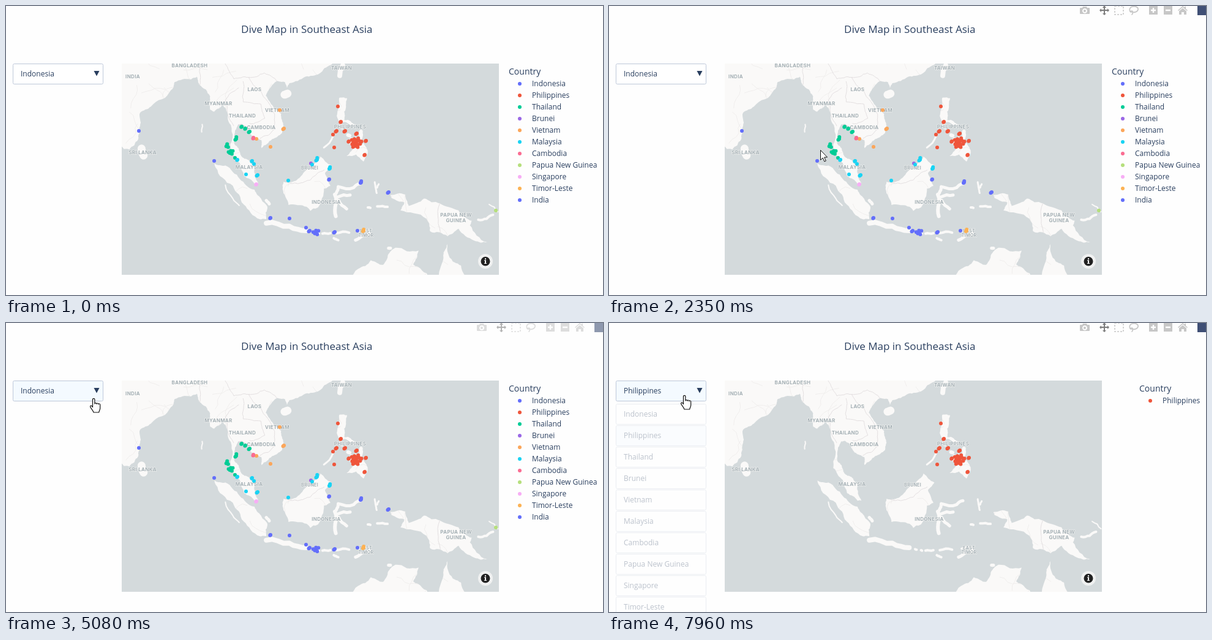
Animation of 975x472 px, one loop 8000 ms. Source, as an HTML page:

```html
<!DOCTYPE html>
<html lang="en">
<head>
<meta charset="utf-8">
<title>Dive Map</title>
<style>
html, body { margin: 0; width: 100%; height: 100%; overflow: hidden; background: #fefefe; }
svg { display: block; }
text { font-family: "Open Sans", "Noto Sans", sans-serif; font-size: 12px; fill: #2a3f5f; white-space: pre; }
.place text { font: 600 8px Inter, "Open Sans", sans-serif; letter-spacing: .35px; fill: #9eaab0; text-anchor: middle; stroke: #f6f6f4; stroke-width: 1.2px; paint-order: stroke; }
.tip text { font: 13px "Liberation Sans", Arial, sans-serif; fill: inherit; }
.tip .head { font-weight: bold; }
.box { stroke: #bec8d9; }
.line { fill: none; stroke-linejoin: round; stroke-linecap: round; }
</style>
</head>
<body>
<svg id="stage" width="975" height="472" viewBox="0 0 975 472"></svg>
<script>
const LOOP = 8000, BLUE = '#636efa', CYAN = '#19d3f3', LAND = '#faf9f8';

// Large coasts as a few "lon,lat" corners; detail comes from rough()
const COASTS = [
  `122,27 118.9,24.7 116.6,23.1 113.7,22.5 110.5,21.3 110,20.4 109.6,21.5 108,21.7 106.6,20.4 105.7,18.9 107.2,16.8 108.8,15.4
   109.3,13 109,11.6 107,10.4 104.8,8.6 104.8,10.2 103.3,10.8 102,12.6 100.9,13.4 100.1,13.3 99.3,10.7 99.4,9.3 100.2,8.5
   100.7,7 102.2,6.2 103.3,4.8 103.5,2.8 104.2,1.4 103.4,1.4 101.3,2.9 100.4,5.6 98.5,8 98.6,13.2 97.6,16.4 96.9,17.2
   95.2,15.8 94.4,16.2 94.4,18.8 92.2,21 91.7,22.5 90.5,22 87.2,21.5 86.5,20 82.4,16.8 80.2,15.6 80.2,13 79.8,10.3 78,8.3
   76.9,8.4 75,12 70,30`,
  '95.3,5.5 97.5,5.1 100.4,2.4 103.4,.2 104.3,-1.1 106,-3.2 105.8,-5.8 104.5,-5.8 101.2,-2.8 99,1 95.5,4.7',
  '109.1,.3 109.3,1.8 111.2,1.8 113.1,3.2 115.4,5.3 116.8,6.9 119,5.1 117.7,3.5 118.8,1 117.5,.4 116.3,-3.4 114.7,-4.1 114,-3.3 110.3,-2.9',
  `131,-.9 134,-.8 134.7,-3.1 137.8,-1.6 141,-2.6 144.8,-4 147.5,-6.1 147.1,-7 150.6,-10.4 148,-10.1 144.8,-7.7 142.6,-9.2 139,-8.2
   138.3,-5.7 133,-4 133.8,-2.4 131.2,-1.5`,
  `121,-19 124.4,-15.7 127,-14 129.5,-14.9 130.8,-12.5 132,-11.5 136.7,-12.1 135.6,-14.8 139,-17.4 140.9,-17.4 141.7,-13 142.5,-10.8
   143.6,-14.2 145.3,-15 147,-19`,
  '120.4,16.2 120.6,18.5 122.2,18.4 121.6,15.8 121.6,14.2 122.9,13.9 120.7,13.8 120.1,15',
  '122.1,7 123.5,8.6 125.5,9.7 126.4,7.6 125.5,5.9 124,7.3'
];

// Long or small islands as strokes, keyed by width in px
const ISLANDS = {
  2: '92.8,13.3 92.7,11.8|97.5,1.1 99,-1.6 100.3,-3|123.9,10.8 123.5,9.7|151,-2.8 152.8,-4.3',
  3: '117.5,8.7 119.3,10.9|127.8,1.7 128,.5 128.2,-.5|128.3,.6 128.6,1.3|124.5,-8.3 126.5,-7.9',
  4: '115.1,-8.4 115.4,-8.5|116.3,-8.6 116.5,-8.7|117.2,-8.7 118.8,-8.6|120.1,-8.6 122.6,-8.5|119.5,-9.6 120.4,-10|126.4,-3.4 126.9,-3.5|128.3,-3.2 130.4,-3.3|123,10.5 122.9,9.5|148.8,-5.9 150.5,-5.7 151.8,-4.9',
  5: '124.8,1.4 123.5,.6 120.4,.8 120,-.5|120.3,-1.3 122.8,-.9|120.5,-2 122.1,-3.7|123.9,-10 125.3,-9.1 126.7,-8.6|105.8,-2 106.4,-2.7|122.3,13.9 123.7,13|130.6,-11.6 131,-11.6',
  6: '120.9,13 121.2,12.7|122.4,11.2 122.7,11.1|125,11.9 124.9,10.6|119.7,-.8 119.9,-2.7 119.9,-5.2',
  8: '121.3,24.6 120.7,22.7|105.8,-6.6 110.5,-7.2 113.9,-8.1',
  13: '109.5,19.1 110.1,19.3|80.5,8.5 80.9,7.1'
};

const BORDERS = [
  '97.4,25 99.2,22.1 102.2,22.4 105.4,23.2 108,21.6', '102.2,22.4 104.6,20 107.5,15.3 107.5,12.4 104.5,10.5',
  '101.1,21.6 101.1,17.7 104.7,17.3 105.5,14.5 102.4,13.5', '100.2,20.4 97.5,18.2 99.2,13', '92.3,20.8 92.3,25 88.3,25.8',
  '109.6,1.9 112.2,1.4 114.8,2.2 117.6,4.2', '141,-2.6 141,-9.1'
];

// Dive sites as "x,y" or "x,y,count,radius" for a cluster
const COUNTRIES = [
  ['Indonesia', BLUE, '340,253 432,346,2,1 463,347 490,362 496,367,2,2 506,370,6,5 537,369,2,2 574,367 528,283,2,1 580,288,3,2 625,304,2,2'],
  ['Philippines', '#ef553b', '542,164 547,189,2,1 540,204,2,2 554,204,2,2 534,210 536,231 573,208,2,2 560,221,2,1 588,220,2,1 586,243,2,1 572,223,15,9'],
  ['Thailand', '#00cc96', '385,197,2,1 391,200,2,1 398,205,2,2 376,217,3,3 361,228,4,3 367,239,6,4 374,248'],
  ['Brunei', '#9a68e6', '498,257'],
  ['Vietnam', '#fba65a', '447,170 454,200,2,2 432,230 409,217'],
  ['Malaysia', CYAN, '378,251,2,1 402,253,2,1 405,258 392,275 411,276,2,2 461,285 500,259 508,251,3,3 529,265,3,2'],
  ['Cambodia', '#fa6c92', '404,216,3,1'],
  ['Papua New Guinea', '#b5df7c', '800,334'],
  ['Singapore', '#f7aef5', '409,291,2,1'],
  ['Timor-Leste', '#fcb254', '584,367,3,2'],
  ['India', BLUE, '217,204']
];

const PLACES = `BANGLADESH,300,100|INDIA,207,118|LAOS,406,139|MYANMAR,347,162|VIETNAM,443,173|THAILAND,386,182|CAMBODIA,417,201
|SRI LANKA,223,242|MALAYSIA,397,266|BRUNEI,496,267|INDONESIA,523,323|PHILIPPINES,562,200|TAIWAN,548,104|PAPUA NEW,735,344
|GUINEA,735,353|EAST,588,370|TIMOR,588,377`;

// [from, to, tip x, tip y, title, country, types, entry, water]
const TIPS = [
  [2420, 2980, 379, 251, 'House Reef and Sandy Slopes Around Lower Benut Lagoon', 'Malaysia', 'Reef', 'None', 'None'],
  [3080, 3240, 405, 258, 'All Dive Sits Surrounding Oma Kudes Island', 'Malaysia', 'Reef', 'None', 'None'],
  [3240, 3420, 412, 277, 'Coral Garden and Boulders Beside the Northern Jetty', 'Malaysia', 'Reef', 'Boat', 'Salt'],
  [3600, 4500, 432, 345, 'Sodatune Shipwreck', 'Indonesia', 'Wreck, Reef', 'Boat', 'Salt']
];

// Pointer keys: time,x,y
const PATH = `550,240,431 1300,172,242 1920,267,209 2590,389,249 2960,388,249 3200,408,273 3710,435,345 4440,435,345
  5080,143,123 5160,135,115 6000,135,115 6360,113,194 6480,113,190 6770,118,122 7090,123,118`;

let seed = 7;
const rnd = () => (seed = seed * 16807 % 2147483647) / 2147483647 - .5;
const ramp = (t, a, b) => Math.min(1, Math.max(0, (t - a) / (b - a)));
const smooth = u => u < .5 ? 4 * u ** 3 : 1 - 4 * (1 - u) ** 3;
const tuples = s => s.trim().split(/\s+/).map(p => p.split(',').map(Number));
const project = ([lon, lat]) => [
  409 + 8.05 * (lon - 103.8),
  301.5 - 8.05 * 180 / Math.PI * Math.log(Math.tan(Math.PI / 4 + lat * Math.PI / 360))
];
const trace = pts => 'M' + pts.map(p => p.map(v => v.toFixed(1))).join('L');

// Displaces the middle of every side, again and again, for natural lines
const rough = (pts, closed, depth) => depth ? rough(pts.flatMap((p, i) => {
  const q = pts[i + 1] || (closed ? pts[0] : p), k = rnd() * .22;
  const dx = q[0] - p[0], dy = q[1] - p[1];
  return [p, [p[0] + dx / 2 - dy * k, p[1] + dy / 2 + dx * k]];
}), closed, depth - 1) : pts;
const shape = (s, closed, depth = 3) => trace(rough(tuples(s).map(project), closed, depth));

const coast = COASTS.map(s => shape(s, true) + 'Z').join('');
const islands = Object.entries(ISLANDS).map(([w, s]) =>
  `<path stroke-width="${w}" d="${s.split('|').map(p => shape(p, false, 2)).join('')}"/>`).join('');
const borders = BORDERS.map(s => shape(s, false)).join('');
const roads = Array.from({ length: 170 }, () => {
  let x = 497 + rnd() * 616, y = 266 + rnd() * 344, a = rnd() * 6.3;
  return trace(Array.from({ length: 6 }, () => [x += 8 * Math.cos(a += rnd() * 1.6), y += 8 * Math.sin(a)]));
}).join('');

const text = (x, y, s, more = '') => `<text x="${x}" y="${y}" ${more}>${s}</text>`;
const button = (y, s) => `<rect class="box" x="11.5" y="${y}.5" width="147" height="33" rx="2" fill="#fff"/>` + text(24, y + 21, s);
const dot = (x, y, c) => `<circle cx="${x}" cy="${y}" r="3" fill="${c}"/>`;

// Sunflower spiral around the cluster centre
const cluster = ([x, y, n = 1, r = 0], c) => Array.from({ length: n }, (_, i) => {
  const d = r * Math.sqrt(i / (n - 1 || 1));
  return dot(x + d * Math.cos(2.4 * i), y + d * Math.sin(2.4 * i), c);
}).join('');

const tip = ([, , x, y, title, country, types, entry, water]) => {
  const [fill, ink] = country === 'Malaysia' ? [CYAN, '#444'] : [BLUE, '#fff'];
  const lines = [title, '', `country=${country}`, `dive_types=${types}`, `entry=${entry}`, `water_type=${water}`];
  return `<g class="tip" fill="${ink}"><path fill="${fill}" stroke="${ink}"/>` +
    lines.map((s, i) => text(x + 9.5, y - 37.5 + i * 16.9, s, i ? '' : 'class="head"')).join('') + '</g>';
};

const modebar = `<g id="bar" fill="#c7c7c7" stroke="#c7c7c7" stroke-width="0">
  <path fill-rule="evenodd" d="M770 3h3l1-2h6l1 2h3q1 0 1 1v8q0 1-1 1h-14q-1 0-1-1V4q0-1 1-1ZM777 4a4 4 0 1 0 .1 0ZM777 6a2 2 0 1 1-.1 0Z"/>
  <path fill="#7c7c7c" d="M809-1l3 4h-2v3h4V4l3 3-3 3V8h-4v4h2l-3 3-3-3h2V8h-4v2l-3-3 3-3v2h4V3h-2Z"/>
  <path fill="none" stroke-width="1.5" stroke-dasharray="3 2" d="M826 0h14v14h-14Z"/>
  <path class="line" stroke-width="1.7" d="M852 10c-3-3-2-8 3-9s10 1 9 5-7 5-10 4-2-2 0-2 2 4 0 6"/>
  <path d="M882 0h14v14h-14ZM906 0h14v14h-14Z"/>
  <path stroke="#fff" stroke-width="2.4" d="M889 3v8M885 7h8M909 7h8"/>
  <path d="M929 7l8-7 3 2.600V1h2v3.400l3 2.600-1 1-7-6-7 6ZM931 8.500l6-5 6 5V14h-4v-4h-4v4h-4Z"/>
  <path fill="#3f4f75" d="M961 0h15v15h-15Z"/></g>`;

const $ = id => document.getElementById(id);
$('stage').innerHTML = `
  <defs><clipPath id="frame"><path d="M189 94h616v345H189Z"/></clipPath>
  <clipPath id="coast"><path d="${coast}"/></clipPath></defs>
  ${text(384, 44, 'Dive Map in Southeast Asia', 'style="font-size:17px"')}
  <g clip-path="url(#frame)">
    <path fill="#d4dadc" d="M189 94h616v345H189Z"/>
    <path fill="${LAND}" d="${coast}"/><g class="line" stroke="${LAND}">${islands}</g>
    <g class="line" clip-path="url(#coast)"><path stroke="#f0eeed" d="${roads}"/><path stroke="#e3dfe0" d="${borders}"/></g>
    <g class="place">${PLACES.split('|').map(p => {
      const [s, x, y] = p.trim().split(',');
      return text(x, y, s, /BRU|EAST|TIM/.test(s) ? 'style="font-size:7px"' : '');
    }).join('')}</g>
    ${COUNTRIES.map(([name, c, at]) => `<g class="${name === 'Philippines' ? '' : 'other'}">${tuples(at).map(p => cluster(p, c)).join('')}</g>`).join('')}
    <circle cx="783" cy="417" r="12" fill="#f0f1f1"/><circle cx="783" cy="417" r="7.500" fill="#222"/>
    <path fill="#fff" d="M782 412h2v2h-2ZM781 415h3v5h1v1h-4v-1h1v-4h-1Z"/>
  </g>
  <g id="legend">${text(821, 112, 'Country', 'style="font-size:14px"')}
    ${COUNTRIES.map(([s, c], i) => `<g class="other">${dot(839, 127 + 19 * i, c) + text(859, 131 + 19 * i, s)}</g>`).join('')}
    <g id="single">${dot(839, 127, COUNTRIES[1][1]) + text(859, 131, 'Philippines')}</g></g>
  <g id="header">${button(94, 'Indonesia')}<path fill="#2a3f5f" d="M143.500 106h9l-4.500 8.500Z"/></g>
  <g id="list">${COUNTRIES.map(([s], i) => button(132 + 35 * i, s)).join('')}</g>
  ${modebar}<g id="tips">${TIPS.map(tip).join('')}</g>
  <g id="pointer" fill="#fff" stroke="#111" stroke-linejoin="round">
    <path id="arrow" d="M.5.5V16.500L4.200 13 6.800 19 9.300 18 6.700 12H11.500Z"/>
    <path id="hand" stroke-width="1.200" d="M-1.500 2a1.700 1.700 0 0 1 3.400 0V9c0-2 3-2 3 .3 0-1.800 3-1.800 3 .5 0-1.600 2.800-1.400 2.800.7V16c0 3-1.500 4-2 7H0c-.5-3-4-6-5.300-9-.6-2 1.600-2.600 2.800-1l1 1.500Z"/>
  </g>`;

const show = (el, on) => { el.style.display = on ? '' : 'none'; };
const others = document.querySelectorAll('.other');
const items = $('list').querySelectorAll('rect');
const headBox = $('header').querySelector('rect'), headText = $('header').querySelector('text');
const keys = tuples(PATH);

// Fit each tooltip box to its widest line
TIPS.forEach(([, , x, y], i) => {
  const g = $('tips').children[i];
  const w = Math.max(...[...g.querySelectorAll('text')].map(el => el.getComputedTextLength())) + 7;
  g.firstChild.setAttribute('d', `M${x} ${y}l6.500-6V${y - 52.5}h${w}v106h${-w}V${y + 6}Z`);
});

function pointerAt(t) {
  const i = keys.findIndex(k => k[0] > t);
  if (i < 1) return keys[i ? keys.length - 1 : 0].slice(1);
  const a = keys[i - 1], b = keys[i], u = ramp(t, a[0], b[0]);
  return [1, 2].map(k => Math.round(a[k] + (b[k] - a[k]) * u));
}

function draw(t) {
  const [x, y] = pointerAt(t), picked = t >= 6600;
  const inMenu = t > 4800 && x < 159;
  const listAlpha = t < 7000 ? smooth(ramp(t, 5280, 5530)) * (1 - ramp(t, 6480, 6620)) : smooth(ramp(t, 7855, 8105));

  show($('pointer'), t >= 550);
  $('pointer').setAttribute('transform', `translate(${x} ${y})`);
  show($('hand'), inMenu);
  show($('arrow'), !inMenu);

  $('bar').style.opacity =
    t < 4700 ? ramp(t, 1150, 1450) :
    t < 4890 ? 1 - ramp(t, 4700, 4880) :
    t < 6640 ? ramp(t, 4890, 5220) : ramp(t, 6680, 6980);

  TIPS.forEach(([from, to], i) => show($('tips').children[i], t >= from && t < to));

  headBox.setAttribute('fill', inMenu && y < 129 ? '#f4faff' : '#fff');
  headText.textContent = picked ? 'Philippines' : 'Indonesia';
  $('list').style.opacity = listAlpha;
  show($('list'), listAlpha > 0);
  const hover = inMenu ? Math.floor((y - 132) / 35) : -1;
  items.forEach((r, i) => r.setAttribute('fill', i === +picked || i === hover ? '#f4faff' : '#fff'));

  others.forEach(el => show(el, !picked));
  show($('single'), picked);
  $('legend').setAttribute('transform', `translate(${picked ? 45 : 0} 0)`);
}

const start = performance.now();
(function tick() {
  draw((performance.now() - start) % LOOP);
  requestAnimationFrame(tick);
})();
</script>
</body>
</html>
```
